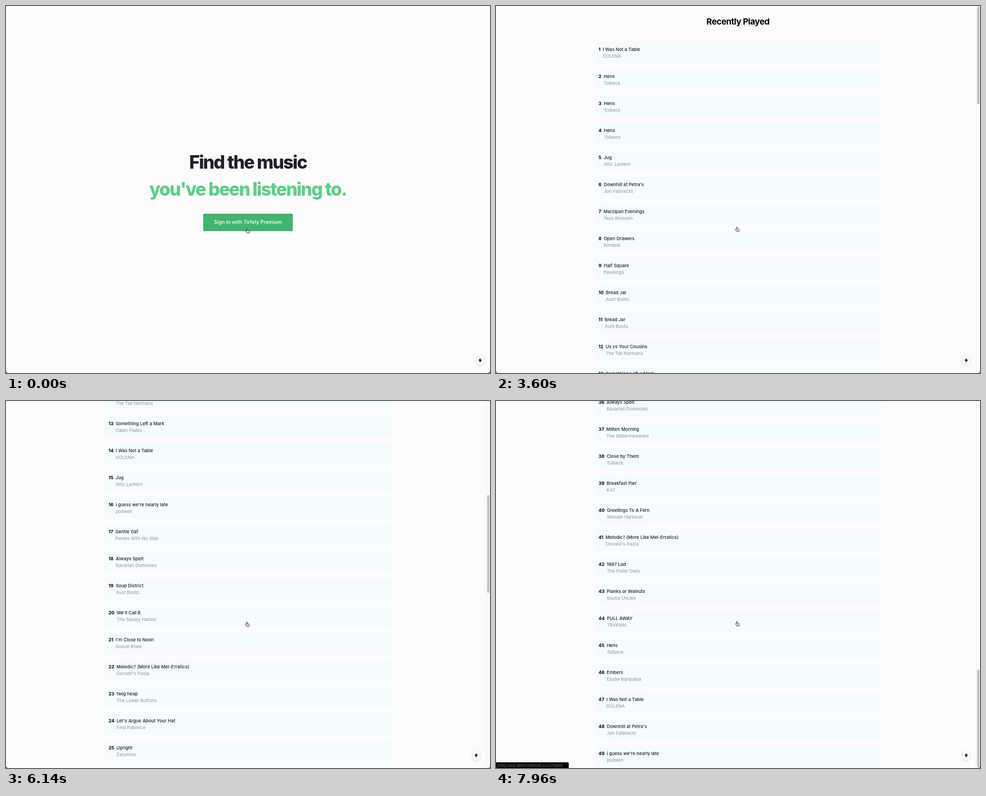
These frames come from a looping animation (859x652 px, 8 s). An HTML page:

```html
<!DOCTYPE html>
<html lang="en">
<head>
<meta charset="utf-8">
<title>Recently Played</title>
<style>
  html, body { margin: 0; width: 100%; height: 100%; overflow: hidden; background: #1d191c; }
  #stage { position: relative; width: 859px; height: 652px; overflow: hidden; background: #fcfcff;
    border-radius: 0 0 4px 4px; font: 8px/12px Inter, sans-serif; color: #1a202c; }
  #stage div, #stage svg { position: absolute; }
  #landing, #list { inset: 0; }

  .headline { left: 0; width: 859px; text-align: center; white-space: nowrap;
    font-size: 32px; line-height: 48px; font-weight: 800; letter-spacing: -.05em; }
  #button { left: 350px; top: 369px; width: 159px; height: 30.5px; border-radius: 2px; background: #41b46f;
    color: #fff; font-size: 9px; line-height: 30.5px; font-weight: 500; text-align: center; white-space: nowrap; }
  #button.focused { box-shadow: inset 0 0 0 1px #a0735f; }

  #scroller { left: 0; top: 0; width: 852px; will-change: transform; }
  #title { left: 0; top: 18px; width: 859px; text-align: center; color: #000;
    font-size: 15px; line-height: 20px; font-weight: 700; letter-spacing: -.025em; }
  #stage .row { left: 175px; width: 503px; height: 24px; padding: 7px 0 7px 7px; display: flex; gap: 4px;
    border-radius: 2px; background: #f5fcff; white-space: nowrap; }
  .row b { color: #000; }
  .row span { font-weight: 500; }
  .row small { display: block; font-size: 8px; font-weight: 400; color: #8b929f; }
  #track { left: 851.5px; top: 0; width: 7.5px; height: 652px; box-sizing: border-box;
    border-left: .5px solid #ececee; background: #fbfbfc; }
  #thumb { left: 853.5px; width: 4px; height: 174px; border-radius: 2px; background: #c1c1b9; }

  #badge { top: 622px; width: 11px; height: 15px; border-radius: 2px; background: #fff;
    box-shadow: 0 1px 5px rgba(0, 0, 0, .16); }
  #badge svg { left: 2px; top: 3px; }
  #status { left: 0; top: 641.5px; height: 11px; padding-left: 2.5px; box-sizing: border-box;
    border-radius: 0 2px 0 0; background: #000; color: #7c7c7c; font-size: 6px; line-height: 11px;
    white-space: nowrap; box-shadow: 0 0 2px rgba(0, 0, 0, .35); }
  #cursor { left: 0; top: 0; }
</style>
</head>
<body>
<div id="stage">
  <div id="landing">
    <div class="headline" style="top:254px">Find the music</div>
    <div class="headline" style="top:302px;color:#5fce88">you've been listening to.</div>
    <div id="button">Sign in with Tirfely Premium</div>
  </div>
  <div id="list">
    <div id="scroller"><div id="title">Recently Played</div></div>
    <div id="track"></div>
    <div id="thumb"></div>
  </div>
  <div id="badge">
    <svg width="7" height="9" viewBox="0 0 7 9"><path d="M4.6 0 .2 5.3h2.9L2.3 9l4.5-5.4H3.9z"/></svg>
  </div>
  <div id="status"></div>
  <svg id="cursor" width="8" height="10" viewBox="0 0 16 20">
    <path d="M5 11V4a1.5 1.5 0 0 1 3 0v4.5l5.5 1a2 2 0 0 1 1.7 2.2L14.5 16l-1 3H6.5L6 17.5l-4.6-5a1.4 1.4 0 0 1 2-2z"
      fill="#fff" stroke="#111" stroke-width="1.6" stroke-linejoin="round"/>
    <path d="M8 13v3.5M11 13v3.5" stroke="#111" stroke-width="1.1"/>
  </svg>
</div>
<script>
const LOOP = 8000, LIST_AT = 3160, MAX_SCROLL = 1755;

const songs = `I Was Not a Table|DOLENA
Hens|Tolbeck
Hens|Tolbeck
Hens|Tolbeck
Jug|Attic Lantern
Downhill at Petra's|Jon Falbrecht
Marzipan Evenings|Tess Wickolm
Open Drawers|Nimbrel
Half Square|Pavelings
Bread Jar|Aunt Boots.
Bread Jar|Aunt Boots.
Us vs Your Cousins|The Tall Normans
Something Left a Mark|Cabin Plates
I Was Not a Table|DOLENA
Jug|Attic Lantern
i guess we're nearly late|pollwen
Gentle Oaf|Ponies With No Stall
Always Spelt|Bavarian Dominoes
Soup District|Aunt Boots.
We'll Call B|The Sleepy Harbor
I'm Close to Noon|Goose Knee
Melodic? (More Like Mel-Erratics)|Dorvelli's Pasta
twig heap|The Lower Buttons
Let's Argue About Your Hat|Find Patience
Upright|Zalummo
Gravel Season|Tolbeck
Seven Spare Keys|Cabin Plates
Lamp Oil|Goose Knee
Patience As Irritation|Bruno The Otter
Half Square|Pavelings
Marshfield|Lil Bontrek
Mostly Confused|Small Rolling Bits
I Missed Pancake Day Too|Dorvelli's Pasta
Drowsy On the Staircase|Foldaway
Birds That Nest Behind Radiators, Etc.|knots.
Always Spelt|Bavarian Dominoes
Mitten Morning|The Watermeadows
Close by Them|Tolbeck
Breakfast Pier|K47
Greetings To A Fern|Wendel Harkison
Melodic? (More Like Mel-Erratics)|Dorvelli's Pasta
1987 Lad|The Polite Owls
Planks or Walnuts|Sauna Uncles
PULL AWAY|TRVKMN
Hens|Tolbeck
Embers|Elodie Barquesa
I Was Not a Table|DOLENA
Downhill at Petra's|Jon Falbrecht
i guess we're nearly late|pollwen`.split("\n").map(line => line.split("|"));

// Each fling moves the page between two offsets and slows to a stop.
const flings = [
  { start: 5640, end: 6420, from: 0, to: 642 },
  { start: 6460, end: 7260, from: 642, to: 1421 },
  { start: 7330, end: 7800, from: 1421, to: MAX_SCROLL },
];

const statuses = [
  { start: 1000, end: LIST_AT, width: 285.5, text: "Waiting for accounts.tirfely.test..." },
  { start: 7850, end: LOOP, width: 128.5, text: "tirfely:track:4kRmZtWbXe8LsuJ2vYQdn5" },
];

const $ = id => document.getElementById(id);
const clamp = v => Math.min(1, Math.max(0, v));
const progress = (t, start, end) => clamp((t - start) / (end - start));
const easeOut = u => 1 - (1 - u) ** 3;

$("scroller").insertAdjacentHTML("beforeend", songs.map(([title, artist], i) =>
  `<div class="row" style="top:${64 + 48 * i}px"><b>${i + 1}</b><span>${title}<small>${artist}</small></span></div>`
).join(""));

function scrollAt(t) {
  return flings.reduce((y, f) => y + (f.to - f.from) * easeOut(progress(t, f.start, f.end)), 0);
}

function render(t) {
  const onList = t >= LIST_AT;
  $("landing").style.display = onList ? "none" : "";
  $("list").style.display = onList ? "" : "none";
  $("button").classList.toggle("focused", t >= 880);
  $("badge").style.left = (onList ? 828.5 : 836) + "px";

  const y = scrollAt(t);
  $("scroller").style.transform = `translateY(${-Math.round(y)}px)`;
  $("thumb").style.top = 1 + 476 * y / MAX_SCROLL + "px";

  const status = statuses.find(s => t >= s.start && t < s.end);
  $("status").style.display = status ? "" : "none";
  if (status) {
    $("status").textContent = status.text;
    $("status").style.width = status.width + "px";
  }

  const moved = easeOut(progress(t, 20, 800));
  const lift = 3 * moved + progress(t, 6500, 7200);
  $("cursor").style.transform = `translate(${425 - .7 * moved}px, ${394.5 - lift}px)`;
}

const began = performance.now();
function tick() {
  render((performance.now() - began) % LOOP);
  requestAnimationFrame(tick);
}
tick();
</script>
</body>
</html>
```
